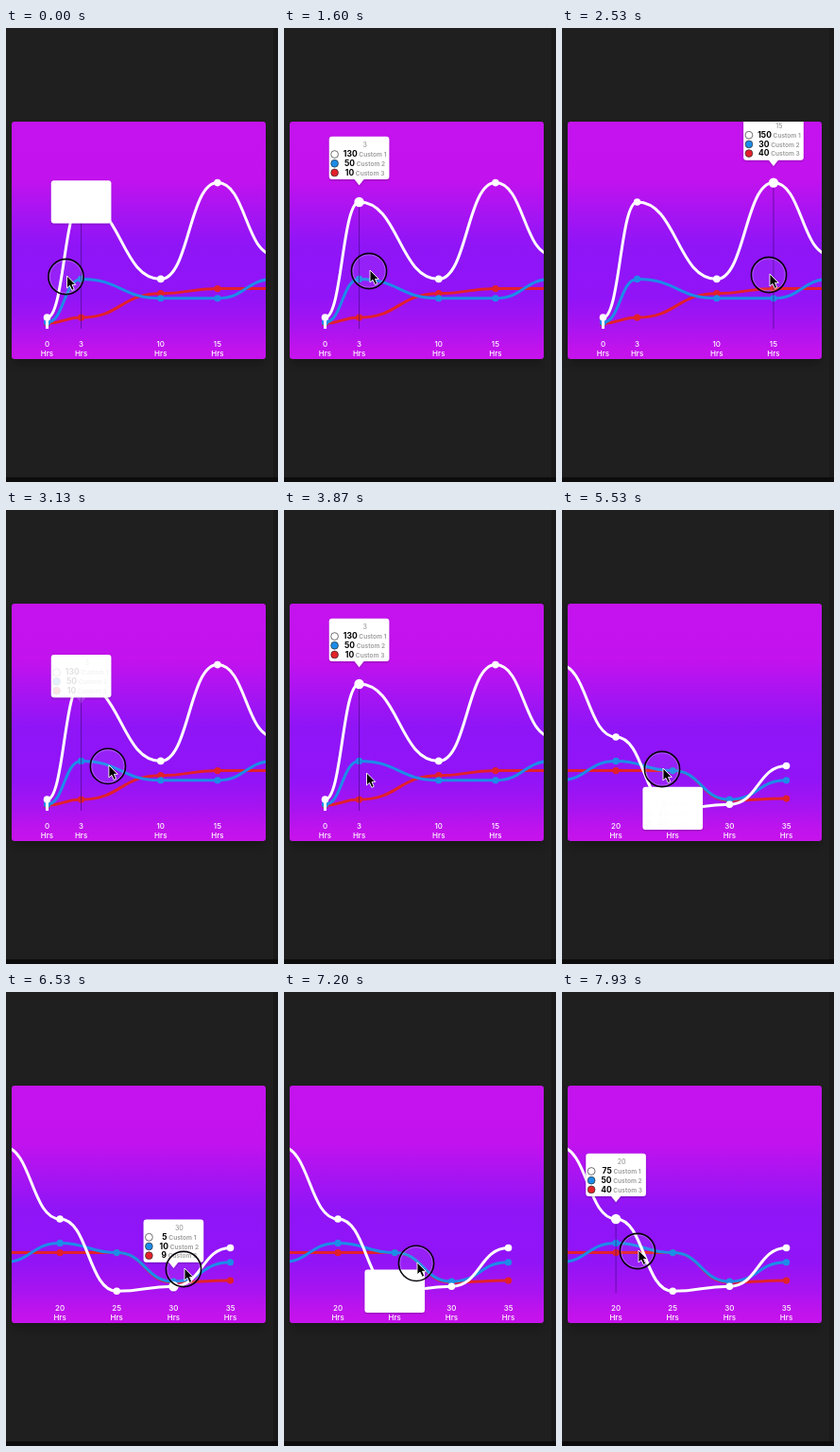
An HTML page that plays this animation: 288 by 480 pixels, repeating every 7990 ms.

```html
<!DOCTYPE html>
<html lang="en">
<head>
<meta charset="utf-8">
<title>Scrolling line chart</title>
<style>
html, body { margin: 0; width: 100%; height: 100%; overflow: hidden; background: #1f1f1f; }
svg { display: block; width: 288px; height: 480px; font-family: Inter, Roboto, sans-serif; text-anchor: middle; }
.axis { font-size: 8px; font-weight: 500; fill: #fff; }
.head { font-size: 7px; font-weight: 500; fill: #999; }
.num { font-size: 8.5px; font-weight: 700; fill: #000; }
.name { font-size: 6.6px; font-weight: 600; fill: #999; }
</style>
</head>
<body>
<svg id="stage" viewBox="0 0 288 480">
  <defs>
    <linearGradient id="sky" x1="0" y1="0" x2="0" y2="1">
      <stop offset="0" stop-color="#c413ee"/>
      <stop offset=".24" stop-color="#c212ee"/>
      <stop offset=".38" stop-color="#a814f2"/>
      <stop offset=".52" stop-color="#8f15f7"/>
      <stop offset=".74" stop-color="#9114f7"/>
      <stop offset=".86" stop-color="#a714f1"/>
      <stop offset=".96" stop-color="#c213ec"/>
      <stop offset="1" stop-color="#c613ec"/>
    </linearGradient>
    <clipPath id="frame"><rect x="6" y="99" width="269" height="251" rx="3"/></clipPath>
    <filter id="soft" x="-20%" y="-20%" width="140%" height="140%"><feGaussianBlur stdDeviation="5"/></filter>
    <filter id="lift" x="-20%" y="-20%" width="140%" height="150%">
      <feDropShadow dx="0" dy="1" stdDeviation="1.2" flood-opacity=".25"/>
    </filter>
  </defs>
  <rect width="288" height="480" fill="#1f1f1f"/>
  <rect x="283" width="5" height="480" fill="#191919"/>
  <rect y="475" width="288" height="5" fill="#0c0c0c"/>
  <rect x="8" y="106" width="265" height="249" fill="#000" opacity=".25" filter="url(#soft)"/>
  <g clip-path="url(#frame)">
    <rect x="6" y="99" width="269" height="251" fill="url(#sky)"/>
    <g id="plot"></g>
  </g>
  <g id="pointer">
    <g id="ring" fill="none">
      <circle r="17.2" stroke="#fff" stroke-opacity=".3" fill="#fff" fill-opacity=".05"/>
      <circle r="18.6" stroke="#08040c" stroke-width="1.6"/>
    </g>
    <path d="M1 -1V12L4 9.3L6.3 14.4L8.7 13.3L6.5 8.4H10.3Z" fill="#000" stroke="#fff" stroke-width=".9" stroke-linejoin="round"/>
  </g>
</svg>
<script>
const LOOP = 7990;
const hours = [0, 3, 10, 15, 20, 25, 30, 35];
const series = [
  { color: '#fff', dot: 3.8, values: [10, 130, 50, 150, 75, 0, 5, 45] },
  { color: '#1d8ce8', dot: 3.6, values: [5, 50, 30, 30, 50, 40, 10, 30] },
  { color: '#e2202c', dot: 3.6, values: [4, 10, 35, 40, 40, 40, 9, 11] }
];
// time, x, y of the touch point
const path = [
  [0, 63.5, 263], [600, 63.5, 263], [1350, 86, 258], [1600, 90, 257], [1800, 121, 257],
  [2110, 194, 260], [2400, 219, 261], [2600, 219, 261], [2760, 194, 263], [3060, 121, 269],
  [3330, 84, 276], [3700, 86.5, 279], [3890, 86.5, 279], [4110, 226, 280], [4370, 125, 276],
  [4580, 106, 274], [6050, 106, 274], [6330, 147, 287], [6530, 188, 293], [6870, 188, 293],
  [7150, 147, 288], [7650, 87, 276], [7930, 80, 274], [7990, 80, 274]
];
// time, scroll offset
const scroll = [[0, 0], [4110, 0], [4370, 105], [4540, 230], [4600, 236.5], [5130, 227], [7990, 227]];
// time, selected point
const picks = [[0, 1], [1800, 2], [2110, 3], [2760, 2], [3060, 1], [5470, 5], [6330, 6], [7150, 5], [7650, 4]];
const touches = [[0, 3740], [4110, 4410], [5470, LOOP]];

const $ = id => document.getElementById(id);
const px = i => 43.5 + hours[i] * 12.03;
const py = v => 316.3 - v * 1.018;
const clamp = v => Math.max(0, Math.min(1, v));

function add(parent, tag, attrs = {}, text) {
  const el = document.createElementNS('http://www.w3.org/2000/svg', tag);
  for (const key in attrs) el.setAttribute(key, attrs[key]);
  if (text !== undefined) el.textContent = text;
  parent.appendChild(el);
  return el;
}

// Monotone cubic through the keys of one column
function track(keys, col, t) {
  let i = 0;
  while (i < keys.length - 2 && t >= keys[i + 1][0]) i++;
  const slope = k => keys[k] && keys[k + 1]
    ? (keys[k + 1][col] - keys[k][col]) / (keys[k + 1][0] - keys[k][0]) : 0;
  const tangent = k => {
    const a = slope(k - 1), b = slope(k);
    return a * b > 0 ? 2 * a * b / (a + b) : 0;
  };
  const span = keys[i + 1][0] - keys[i][0];
  const u = clamp((t - keys[i][0]) / span), v = 1 - u;
  return keys[i][col] * v * v * (1 + 2 * u) + keys[i + 1][col] * u * u * (3 - 2 * u)
    + span * u * v * (tangent(i) * v - tangent(i + 1) * u);
}

function curve(values) {
  return values.map((v, i) => {
    if (!i) return `M${px(0)} ${py(v)}`;
    const mid = (px(i - 1) + px(i)) / 2;
    return `C${mid} ${py(values[i - 1])} ${mid} ${py(v)} ${px(i)} ${py(v)}`;
  }).join('');
}

const plot = $('plot');
for (const s of [...series].reverse()) {
  add(plot, 'path', { d: curve(s.values), fill: 'none', stroke: s.color, 'stroke-width': 3 });
  s.values.forEach((v, i) => add(plot, 'circle', { cx: px(i), cy: py(v), r: s.dot, fill: s.color }));
}
add(plot, 'path', { d: `M${px(0)} 309V318`, stroke: '#fff', 'stroke-width': 3 });
hours.forEach((h, i) => {
  add(plot, 'text', { x: px(i), y: 337, class: 'axis' }, h);
  add(plot, 'text', { x: px(i), y: 346.5, class: 'axis' }, 'Hrs');
});

const guide = add(plot, 'path', { stroke: '#3a0a78', 'stroke-opacity': .6 });
const bigDot = add(plot, 'circle', { r: 5.2, fill: '#fff' });
const tip = add(plot, 'g', { filter: 'url(#lift)' });
const arrow = add(tip, 'path', { d: 'M-5.5 44.5H5.5L0 51.5Z', fill: '#fff' });
add(tip, 'rect', { x: -31.8, width: 63.6, height: 45.3, rx: 3, fill: '#fff' });
const info = add(tip, 'g');
const head = add(info, 'text', { x: 6, y: 11.5, class: 'head' });
const nums = series.map((s, i) => {
  const y = 18.8 + i * 9.7;
  add(info, 'circle', { cx: -26, cy: y, r: 3.9, fill: s.color, stroke: '#333', 'stroke-width': .7 });
  const row = add(info, 'text', { x: 6, y: y + 2.7 });
  const num = add(row, 'tspan', { class: 'num' });
  add(row, 'tspan', { class: 'name' }, ` Custom ${i + 1}`);
  return num;
});

let shown = -1;
function select(i) {
  if (i === shown) return;
  shown = i;
  const y = py(series[0].values[i]);
  head.textContent = hours[i];
  nums.forEach((n, k) => n.textContent = series[k].values[i]);
  guide.setAttribute('d', `M${px(i)} ${y}V318`);
  bigDot.setAttribute('cx', px(i));
  bigDot.setAttribute('cy', y);
}

function draw(t) {
  const [since, i] = picks.filter(p => p[0] <= t).pop();
  select(i);
  // The card starts centred on the point, then springs above it
  const u = clamp((t - since - 60) / 230) - 1;
  const rise = 1 + 2 * u ** 3 + u ** 2;
  const fade = clamp((u + 1) * 2.5);
  tip.setAttribute('transform', `translate(${px(i)} ${py(series[0].values[i]) - 22.7 - 46.5 * rise})`);
  info.setAttribute('opacity', fade);
  arrow.setAttribute('opacity', fade);

  plot.setAttribute('transform', `translate(${-track(scroll, 1, t)} 0)`);
  $('pointer').setAttribute('transform', `translate(${track(path, 1, t)} ${track(path, 2, t)})`);
  $('ring').setAttribute('opacity', touches.some(([a, b]) => t >= a && t < b) ? 1 : 0);
}

const start = performance.now();
function tick() {
  draw((performance.now() - start) % LOOP);
  requestAnimationFrame(tick);
}
tick();
</script>
</body>
</html>
```
